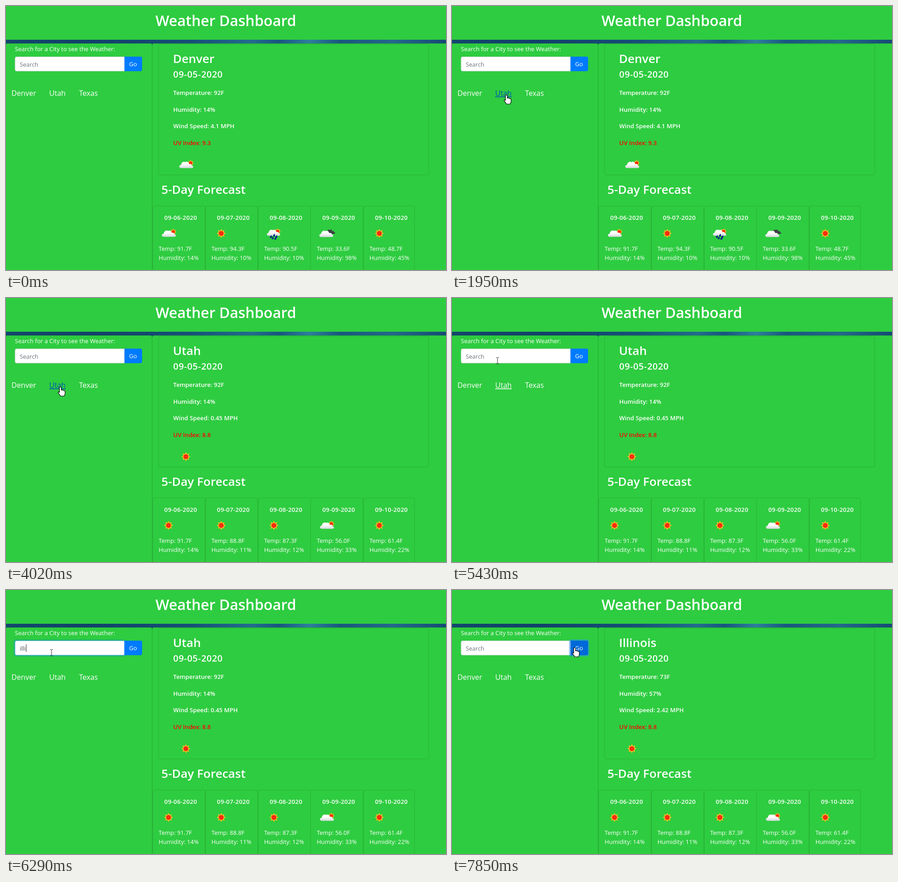
Animation of 967x579 px, one loop 8000 ms. Source, as an HTML page:

```html
<!DOCTYPE html>
<html lang="en">
<head>
<meta charset="utf-8">
<title>Weather Dashboard</title>
<style>
html, body { margin: 0; width: 100%; height: 100%; overflow: hidden; background: #2ecc40; }
svg { display: block; font-family: "Open Sans", "Noto Sans", sans-serif; }
text { fill: #fff; font-size: 13px; white-space: pre; }
.title { font-size: 32px; font-weight: 600; }
.head { font-size: 26.1px; font-weight: 600; }
.date { font-size: 19.8px; font-weight: 600; letter-spacing: .03em; }
.day { font-size: 13.3px; font-weight: 600; letter-spacing: .02em; }
.fact { font-size: 13.2px; font-weight: 600; }
.uv { fill: #f00; }
.link { font-size: 16.1px; }
.hint { fill: #6c757d; }
.typed { fill: #495057; }
.option { font-size: 10.6px; font-weight: 500; }
.card { fill: #2ecc40; stroke: #28b238; }
.ring { fill: none; stroke-width: 2.7; }
</style>
</head>
<body>
<svg width="967" height="579" viewBox="0 0 967 579">
  <defs>
    <linearGradient id="sky">
      <stop offset="0" stop-color="#13466c"/>
      <stop offset=".2" stop-color="#12406a"/>
      <stop offset=".42" stop-color="#164f78"/>
      <stop offset=".56" stop-color="#226c8d"/>
      <stop offset=".62" stop-color="#175480"/>
      <stop offset=".69" stop-color="#2d7f9c"/>
      <stop offset=".76" stop-color="#18567e"/>
      <stop offset=".88" stop-color="#23688a"/>
      <stop offset="1" stop-color="#154a74"/>
    </linearGradient>
    <radialGradient id="core">
      <stop offset="0" stop-color="#ff3a1c"/>
      <stop offset=".7" stop-color="#f5200c"/>
      <stop offset="1" stop-color="#ff6a10"/>
    </radialGradient>
    <linearGradient id="puff" x2="0" y2="1">
      <stop offset=".4" stop-color="#fff"/>
      <stop offset="1" stop-color="#d3d6da"/>
    </linearGradient>
    <path id="cloud" d="M-10 7.5C-16 7.5-16 1-10.5 .5C-10-5-5-8.5-1-5.5C3-8 7-5 7-1C11-2.5 13.5 0 13 2C17.5 2.5 17 7.5 13 7.5Z"/>
    <path id="drop" d="M2-4Q4 1.5 1.4 3.2Q-2.8 4-2 0Z" fill="#0b1b8c"/>
    <path id="arrow" d="M0 0V16.5L3.8 13L6.4 18.8L9 17.6L6.5 12H11.7Z" fill="#fff" stroke="#000"/>
    <path id="hand" d="M-2 2Q0-1.2 2 2V7.5Q4 6 5.5 8Q7.4 7 8.4 9Q10.4 8.4 10.4 11V15Q10 18 8.3 20.5H.2Q-1.8 17-5 13.4Q-5.4 10-2 12.4Z" fill="#fff" stroke="#000" stroke-width="1.2"/>
    <path id="ibeam" d="M-3-6.5H-1L0-5.5L1-6.5H3M0-5.5V6.5M-3 7.5H-1L0 6.5L1 7.5H3" fill="none" stroke="#222"/>
  </defs>
  <g id="page"></g>
  <g id="live"></g>
</svg>
<script>
const LOOP = 8000, PITCH = 115.8;
const byId = id => document.getElementById(id);
const text = (x, y, cls, value, extra = '') => `<text x="${x}" y="${y}" class="${cls}" ${extra}>${value}</text>`;
const box = (x, y, w, h, attrs) => `<rect x="${x}" y="${y}" width="${w}" height="${h}" ${attrs}/>`;
const use = (id, x, y, scale = 1, attrs = '') => `<use href="#${id}" transform="translate(${x} ${y}) scale(${scale})" ${attrs}/>`;

function sun(x, y, scale = 1) {
  const rays = Array.from({ length: 16 }, (_, i) => {
    const r = i % 2 ? 6 : 10.3, a = i * Math.PI / 8;
    return (r * Math.sin(a)).toFixed(1) + ',' + (-r * Math.cos(a)).toFixed(1);
  });
  return `<g transform="translate(${x} ${y}) scale(${scale})"><polygon points="${rays.join(' ')}" fill="#ffb31a"/>` +
    '<circle r="6" fill="url(#core)" stroke="#ffd23c" stroke-width="1"/></g>';
}
const white = 'fill="url(#puff)"';
const icons = {
  sun: (x, y) => sun(x, y),
  partly: (x, y) => sun(x + 10.5, y - 3.5, .7) + use('cloud', x, y, 1, white),
  rain: (x, y) => sun(x + 8, y - 4, .72) + use('cloud', x - 1.5, y - 2, .95, white) +
    [[-7, 7], [0, 4], [5, 7], [-3, 10], [3, 11]].map(([dx, dy]) => use('drop', x + dx, y + dy, .85)).join(''),
  cloudy: (x, y) => use('cloud', x + 8, y - 4, .66, 'fill="#3c4045"') + use('cloud', x - 1.5, y + .5, 1, white)
};

const denverDays = [['partly', 91.7, 14], ['sun', 94.3, 10], ['rain', 90.5, 10], ['cloudy', 33.6, 98], ['sun', 48.7, 45]];
const utahDays = [['sun', 91.7, 14], ['sun', 88.8, 11], ['sun', 87.3, 12], ['partly', '56.0', 33], ['sun', 61.4, 22]];

const start = {
  city: 'Denver', temp: 92, humidity: 14, wind: '4.1', uv: 9.3, icon: 'partly', days: denverDays,
  mouse: null, link: '', value: '', focus: '', menu: false, caret: false, squiggle: false, hover: false
};
const glide = (from, step, points) => points.map((mouse, i) => [from + i * step, { mouse }]);

const steps = [
  ...glide(1180, 110, [['arrow', 67, 494], ['arrow', 74, 424], ['arrow', 90, 350], ['arrow', 107, 290],
    ['arrow', 124, 246], ['arrow', 134, 218]]),
  [1840, { mouse: ['hand', 125, 199], link: 'hover' }],
  [1950, { mouse: ['hand', 119.5, 194.5] }],
  [3690, { city: 'Utah', wind: '0.45', icon: 'sun' }],
  [4020, { uv: 8.8, days: utahDays }],
  [5210, { mouse: ['arrow', 113, 174], link: 'focus' }],
  [5320, { mouse: ['arrow', 103, 149] }],
  [5430, { mouse: ['ibeam', 100, 137] }],
  [5760, { focus: 'input', link: '', caret: true }],
  [5860, { menu: true }],
  [6290, { menu: false, value: 'illi' }],
  [6410, { value: 'illinois', squiggle: true }],
  [6840, { caret: false }],
  ...glide(6840, 110, [['ibeam', 112, 139], ['ibeam', 160, 140], ['ibeam', 216, 139]]),
  [7180, { mouse: ['ibeam', 255, 137] }],
  [7300, { mouse: ['hand', 265, 141], hover: true }],
  [7410, { mouse: ['hand', 270, 130] }],
  [7520, { mouse: ['hand', 269.5, 126], focus: 'button' }],
  [7620, { value: '', squiggle: false }],
  [7850, { city: 'Illinois', temp: 73, humidity: 57, wind: '2.42' }]
];

function cardBox(i) {
  const x = Math.round(322 + i * PITCH) + .5;
  return box(x, 438.5, i < 4 ? 115 : 112.5, 160, 'rx="3.4" class="card"');
}

byId('page').innerHTML =
  box(0, 74, 967, 16, 'fill="url(#sky)"') +
  text(483, 43.5, 'title', 'Weather Dashboard', 'text-anchor="middle"') +
  box(-.5, 82.5, 321.5, 520, 'rx="3.4" class="card"') +
  box(321.5, 82.5, 660, 520, 'rx="3.4" class="card"') +
  box(335.5, 83.5, 593.5, 287, 'rx="3.4" class="card"') +
  text(19.5, 98.7, '', 'Search for a City to see the Weather:') +
  text(341.5, 412, 'head', '5-Day Forecast') +
  text(367.5, 157.3, 'date', '09-05-2020') +
  [0, 1, 2, 3, 4].map(cardBox).join('') +
  ['06', '07', '08', '09', '10'].map((d, i) => text(347.8 + i * PITCH, 469.3, 'day', `09-${d}-2020`)).join('');

function searchForm(s) {
  const active = s.focus === 'input', pressed = s.focus === 'button';
  return '<path d="M260 111H295.6Q299 111 299 114.4V139.6Q299 143 295.6 143H260Z" fill="' +
    (s.hover ? '#0069d9' : '#007bff') + '"/>' +
    `<path d="M260 111.5H23.4Q20 111.5 20 114.9V139.4Q20 142.8 23.4 142.8H260Z" fill="#fff" stroke="${active ? '#80bdff' : '#ced4da'}"/>` +
    (active ? box(18.2, 109.8, 243.2, 34.6, 'rx="4" class="ring" stroke="#007bff" stroke-opacity=".28"') : '') +
    (pressed ? box(258.6, 109.7, 41.8, 34.6, 'rx="3" class="ring" stroke="#268fff" stroke-opacity=".5"') : '') +
    text(270.6, 132.2, '', 'Go') +
    text(30.2, 132.6, s.value ? 'typed' : 'hint', s.value || 'Search') +
    (s.squiggle ? '<path d="M31 135' + 'l1.5-1.5l1.5 1.5'.repeat(13) + '" fill="none" stroke="#e33" stroke-width=".9"/>' : '');
}

function links(s) {
  const blue = s.link === 'hover' ? 'fill:#0056b3;' : '';
  const line = s.link ? 'text-decoration:underline' : '';
  return text(12, 197.4, 'link', 'Denver') +
    text(95, 197.4, 'link', 'Utah', `style="${blue}${line}"`) +
    text(160.4, 197.4, 'link', 'Texas');
}

function report(s) {
  const facts = [`Temperature: ${s.temp}F`, `Humidity: ${s.humidity}%`, `Wind Speed: ${s.wind} MPH`, `UV Index: ${s.uv}`];
  return text(367, 125.3, 'head', s.city) +
    facts.map((f, i) => text(367.6, 194.9 + i * 36.7, i === 3 ? 'fact uv' : 'fact', f)).join('') +
    icons[s.icon](395.3, 348) +
    s.days.map(([icon, temp, humidity], i) => {
      const x = i * PITCH;
      return icons[icon](357.2 + x, 498.8) +
        text(335.6 + x, 536.6, '', `Temp: ${temp}F`) +
        text(335.6 + x, 557, '', `Humidity: ${humidity}%`);
    }).join('');
}

function overlay(s) {
  const menu = s.menu
    ? box(19, 144.5, 242.5, 44.5, 'rx="3" fill="#000" fill-opacity=".25"') +
      box(19.5, 144, 241, 44, 'rx="2.5" fill="#292a2d"') + text(29.8, 170.2, 'option', 'denver')
    : '';
  const caretX = { illi: 44.5, illinois: 70 }[s.value] || 31;
  const caret = s.caret ? box(caretX - .5, 119, 1, 17, 'fill="#333"') : '';
  return menu + caret + (s.mouse ? use(...s.mouse) : '');
}

const origin = performance.now();
let shown = -1;
function frame() {
  const t = (performance.now() - origin) % LOOP;
  const count = steps.filter(([at]) => at <= t).length;
  if (count !== shown) {
    shown = count;
    const s = Object.assign({}, start, ...steps.slice(0, count).map(step => step[1]));
    byId('live').innerHTML = searchForm(s) + links(s) + report(s) + overlay(s);
  }
  requestAnimationFrame(frame);
}
frame();
</script>
</body>
</html>
```
